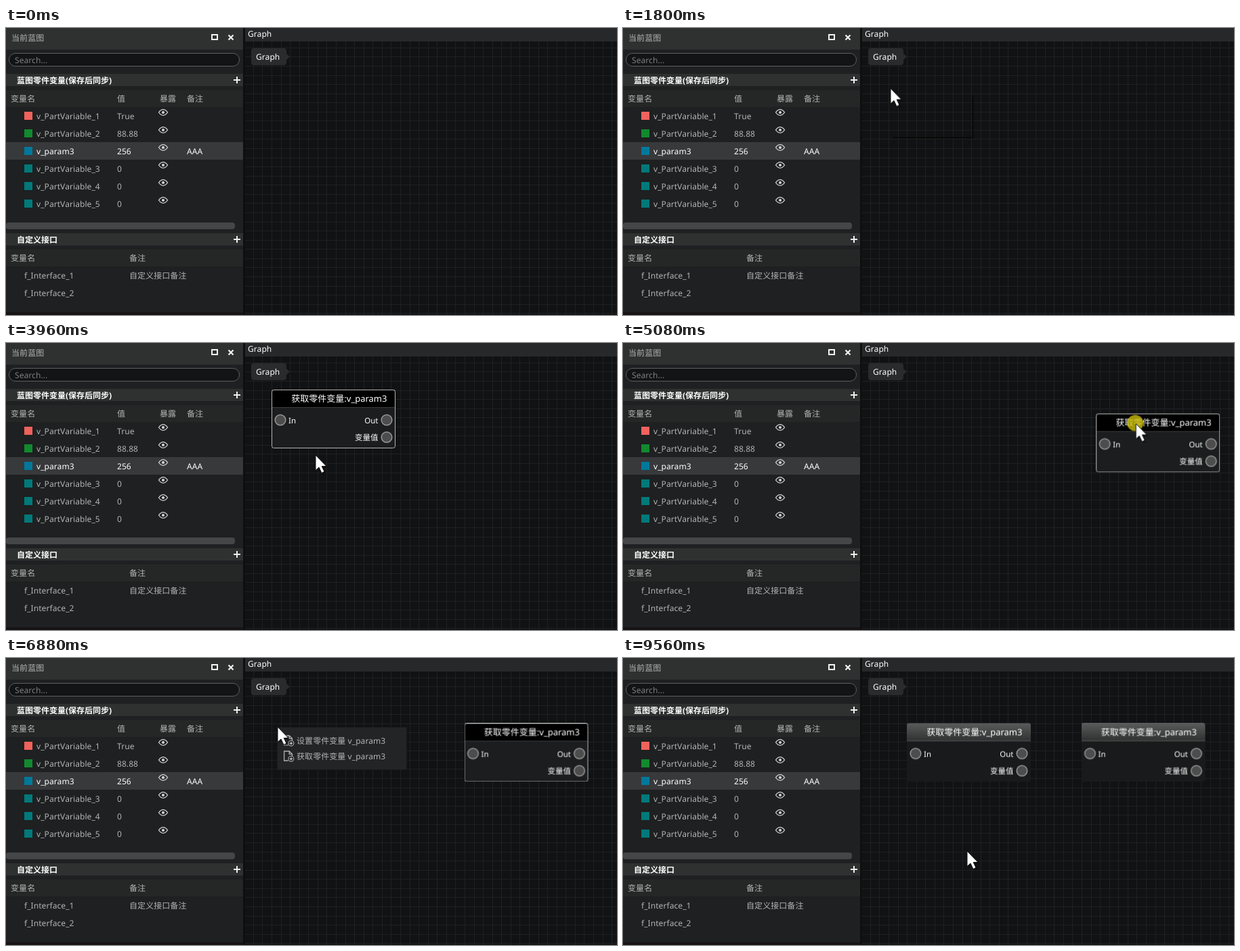
Animation, 902 px wide and 425 px high, one loop 10 s. Source, as an HTML page:

```html
<!DOCTYPE html>
<html lang="zh-CN">
<head>
<meta charset="utf-8">
<title>Graph</title>
<style>
html, body { margin: 0; width: 100%; height: 100%; overflow: hidden; background: #111213; }
svg { display: block; width: 902px; height: 425px; }
text {
  font: 12px 'Noto Sans', 'Noto Sans CJK SC', 'Noto Sans CJK', 'Noto Sans CJK JP', sans-serif;
  letter-spacing: .07px; white-space: pre; text-rendering: geometricPrecision;
}
.bold { font-weight: 700; letter-spacing: 0; }
.title { font-size: 13px; letter-spacing: 0; }
.port { font-size: 11.5px; letter-spacing: 0; }
</style>
</head>
<body>
<svg id="stage" viewBox="0 0 902 425"></svg>
<script>
const LOOP = 10000;
const GREY = '#b3b4b4', WHITE = '#fff';

// ---------- drawing helpers ----------
const text = (x, y, s, fill = GREY, attrs = '') =>
  `<text x="${x}" y="${y}" fill="${fill}" ${attrs}>${s}</text>`;
const rect = (x, y, w, h, fill, attrs = '') =>
  `<rect x="${x}" y="${y}" width="${w}" height="${h}" fill="${fill}" ${attrs}/>`;
const line = (d, stroke, width = 1, attrs = '') =>
  `<path d="${d}" fill="none" stroke="${stroke}" stroke-width="${width}" ${attrs}/>`;
const group = (id, body) => `<g id="${id}">${body}</g>`;

const plus = y => line(`M336 ${y}h10m-5-5v10`, '#eee', 2);
const eye = y => `<g transform="translate(232 ${y})">` +
  line('M-6.5 0Q-3.5-4.3 0-4.3T6.5 0Q3.5 4.3 0 4.3T-6.5 0Z', '#d4d4d4', 1.3) +
  `<circle r="2.1" fill="#d4d4d4"/></g>`;

const variables = [
  ['#f0625c', 'v_PartVariable_1', 'True'],
  ['#128a2e', 'v_PartVariable_2', '88.88'],
  ['#00789c', 'v_param3', '256', 'AAA'],
  ['#00797a', 'v_PartVariable_3', '0'],
  ['#00797a', 'v_PartVariable_4', '0'],
  ['#00797a', 'v_PartVariable_5', '0']
];

function variableCells([color, name, value, note = ''], y, fill) {
  return rect(27, y - 6, 12, 12, color) + text(45, y + 5, name, fill) +
    text(164, y + 5, value, fill) + text(267, y + 5, note, fill);
}

function panel() {
  const rows = variables.map((v, i) => {
    const y = 130 + 26 * i, chosen = i === 2;
    return (chosen ? rect(0, 169, 350, 26, '#38393b') : '') +
      variableCells(v, y, chosen ? WHITE : GREY) + eye(y - 5);
  }).join('');
  return rect(0, 0, 350, 425, '#1e2021') + rect(0, 0, 350, 32, '#2f3131') +
    text(8, 18.5, '当前蓝图') +
    rect(304, 10, 8, 7, 'none', 'stroke="#f2f2f2" stroke-width="2"') +
    line('M328.5 10.5l7 7m0-7l-7 7', '#f2f2f2', 2.2) +
    rect(4.5, 37.5, 340, 19, '#131416', 'rx="9.5" stroke="#5c5e5f"') +
    text(13, 52, 'Search...', '#7c7e7f') +
    rect(0, 68, 350, 18, '#2f3131') + text(16, 81.5, '蓝图零件变量(保存后同步)', WHITE, 'class="bold"') + plus(77) +
    rect(0, 92, 350, 25, '#252727') +
    text(7, 109, '变量名') + text(164, 109, '值') + text(227, 109, '暴露') + text(267, 109, '备注') +
    rows + rect(0, 288, 338, 10, '#454647', 'rx="4"') +
    rect(0, 304, 350, 18, '#2f3131') + text(16, 318, '自定义接口', WHITE, 'class="bold"') + plus(313) +
    rect(0, 328, 350, 25, '#252727') + text(7, 345, '变量名') + text(182, 345, '备注') +
    text(27, 371, 'f_Interface_1') + text(182, 371, '自定义接口备注') + text(27, 397, 'f_Interface_2') +
    rect(0, 421, 350, 4, '#171416');
}

function graph() {
  const pitch = 13.57;
  let grid = '';
  for (let x = 364.9; x < 902; x += pitch) grid += `M${Math.round(x) + .5} 20V425`;
  for (let y = 28.8; y < 425; y += pitch) grid += `M353 ${Math.round(y) + .5}H902`;
  return rect(350, 0, 552, 425, '#111213') + line(grid, '#1f2021') +
    rect(350, 0, 3, 425, '#0e0f10') + rect(353, 0, 549, 20, '#27282a') + text(357, 13, 'Graph', WHITE) +
    rect(362, 30, 52, 25, '#2a2b2c', 'rx="4"') + `<path d="M414 38l5 4.5-5 4.5z" fill="#2a2b2c"/>` +
    text(369, 47, 'Graph', WHITE);
}

// Node drawn with its top left corner at 0,0
function node(id) {
  const port = (x, y) => `<circle cx="${x}" cy="${y}" r="7.8" fill="#4d4d4d" stroke="#989898" stroke-width="1.5"/>`;
  return group(id,
    rect(0, 0, 183, 87, '#191a1b', 'rx="3"') +
    `<path d="M0 27V3q0-3 3-3h177q3 0 3 3v24z" fill="url(#head)"/>` +
    group(id + 'Chosen',
      rect(.5, .5, 182, 86, '#1c1d1e', 'rx="3"') + rect(1, 1, 181, 26, '#000', 'rx="2"') +
      line('M1 26.5h181', '#3b3c3c') +
      rect(.5, .5, 182, 86, 'none', 'rx="3" stroke="#b4b4b4"')) +
    text(29.3, 18, '获取零件变量:v_param3', WHITE, 'class="title"') +
    port(13, 45) + port(170, 45) + port(170, 70.5) +
    text(25, 49.5, 'In', WHITE, 'class="port"') +
    text(157.5, 49.5, 'Out', WHITE, 'class="port" text-anchor="end"') +
    text(157.5, 75, '变量值', WHITE, 'class="port" text-anchor="end"'));
}

function icon(x, y, call) {
  const body = call
    ? `<path d="M.5-7h8l4 4v9.500h-12z" fill="#d3e6f3"/>` + line('M2.500-3h5m-5 3h7m-7 3h5', '#6fa9d0') +
      `<circle cx="10.500" cy="4.500" r="3.800" fill="#58a843"/>` + line('M8.500 4.500h4m-2-2v4', WHITE, 1.3)
    : line('M7 6.500H1.500v-13h7l4 4V0M8.500-6.500v4h4', '#b0b1b1', 1.2) +
      `<circle cx="11" cy="4" r="3.700" fill="#222425" stroke="#b0b1b1"/>` + line('M9 4h4m-2-2v4', '#c8c8c8', 1.2);
  return `<g transform="translate(${x} ${y}) scale(1.08)">${body}</g>`;
}
const item = (x, y, label, fill = GREY) =>
  icon(x, y, label.startsWith('调用')) + text(x + 20, y + 4.5, label, fill);
const hotItem = (id, x, y, w, label) =>
  group(id, rect(x - 8, y - 11, w, 23, '#37393b') + item(x, y, label, WHITE));
const board = (x, y, w, h) =>
  rect(x - 1, y - 1, w + 2, h + 2, '#17191a') + rect(x, y, w, h, '#222425');

function popup(id, w, h, query, rows = '') {
  return group(id, board(390, 95, w, h) +
    rect(396.5, 108.5, w - 13, 19, '#131416', 'rx="4" stroke="#2f7de0"') +
    text(405, 122.5, query || 'Search...', query ? '#c4c5c5' : '#6c6e6f') +
    rect(393, 137, 12, 12, '#111214', 'rx="2"') + line('M395.500 143l2.500 3 5-6', '#2f8dff', 2) +
    text(413, 147.5, '开启联想', WHITE) + rows);
}
const list = labels => labels.map((s, i) => item(399, 164 + 23 * i, s)).join('');

const GET = '获取零件变量 v_param3', SET = '设置零件变量 v_param3';
const calls = [
  '调用UI控件接口:AddTouchEventParams(开启按钮回调功能)',
  '调用模型组件客户端接口:RegisterAnim1DControlParam(注册1D动画线性混合参数)',
  '调用模型组件客户端接口:SetAnim1DControlParam(设置1D动画线性混合参数)',
  '调用虚拟世界组件客户端接口:ModelRegisterAnim1DControlParam(模型注册1D动画线性混合参数)',
  '调用虚拟世界组件客户端接口:ModelSetAnim1DControlParam(模型设置1D动画线性混合参数)'
];
const builders = ['构造方块基础信息字典', '构造列表', '构造物品信息字典', '构造字典', GET, SET];
const matches = list([...calls, ...builders]);
const broad = list([...calls, '调用粒子组件客户端接口:SetParticleParent(设置粒子父级)', ...builders]);
const categories = ['事件', '流程控制', '变量', '接口', '数学', '逻辑', '字符串', '列表', '字典', '组件', '其他']
  .map((s, i) => line(`M400 ${160 + 23 * i}l4 4-4 4`, GREY, 1.3) + text(413, 168.5 + 23 * i, s)).join('');

const arrow = 'M0 0V22.500L5 18 9 26.500 13 24.500 9.200 16.500H16Z';

// ---------- scene ----------
stage.innerHTML =
  `<defs><linearGradient id="head" x2="0" y2="1"><stop stop-color="#5a5b5b"/><stop offset=".9" stop-color="#333434"/>
   <stop offset="1" stop-color="#4a4b4b"/></linearGradient></defs>` +
  graph() + panel() + node('nodeA') + node('nodeB') +
  popup('open', 127, 328, '', categories) +
  popup('typeP', 127, 328, 'p', categories) +
  popup('typePa', 127, 328, 'pa', categories) +
  popup('typePar', 127, 68, 'par') +
  group('trace', line('M398 162.500H516.500V100', '#090a0a', 2)) +
  popup('widePar', 530, 330, 'par', broad) +
  popup('widePara', 530, 320, 'para', matches) +
  popup('wideParam', 530, 320, 'param', matches) +
  popup('narrow', 192, 114, 'param3', list([GET, SET]) + hotItem('hotGet', 399, 164, 190, GET)) +
  group('caretA', line('M443.500 110v17', '#ddd')) +
  group('caretB', line('M450.500 110v17', '#ddd')) +
  group('menu', board(401, 103, 190, 62) + item(409, 122, SET) + item(409, 145, GET) +
    hotItem('hotTop', 409, 122, 190, SET) + hotItem('hotBottom', 409, 145, 190, GET)) +
  group('insert', line('M19 142.500H350', '#eee')) +
  group('cursor',
    group('ghost', `<g transform="translate(-110 -183)">${rect(19, 169, 331, 26, '#38393b')}${variableCells(variables[2], 182, WHITE)}</g>`) +
    group('press', `<circle cx="-1" cy="-1" r="12" fill="#c9bd08" opacity=".8"/>`) +
    group('bigArrow', `<path d="${arrow}" transform="translate(2 2)" opacity=".35"/>
      <path d="${arrow}" fill="#fff" stroke="#111"/>`) +
    group('dragArrow', `<path d="${arrow}" transform="scale(.7)" fill="#fff" stroke="#111" stroke-width="1.300"/>` +
      rect(10.5, 19.5, 8, 8, WHITE, 'stroke="#111"') + line('M12 23.500h5m-2.500-2.500v5', '#111', 1.4)));

// ---------- motion ----------
const el = id => document.getElementById(id);

function run(id, frames) {
  if (frames[0].offset > 0) frames.unshift({ ...frames[0], offset: 0, easing: 'step-end' });
  frames.push({ ...frames[frames.length - 1], offset: 1 });
  el(id).animate(frames, { duration: LOOP, iterations: Infinity });
}

// Visible during each [on, off] span
function show(id, ...spans) {
  const frames = [{ offset: 0, opacity: 0, easing: 'step-end' }];
  for (const [on, off] of spans) {
    frames.push({ offset: on / LOOP, opacity: 1, easing: 'step-end' });
    if (off < LOOP) frames.push({ offset: off / LOOP, opacity: 0, easing: 'step-end' });
  }
  run(id, frames);
}

// Points of [time, x, y, easing towards the next point]
function move(id, points) {
  run(id, points.map(([t, x, y, easing = 'linear']) =>
    ({ offset: t / LOOP, transform: `translate(${x}px, ${y}px)`, easing })));
}

const SOFT = 'ease-in-out';
move('cursor', [
  [120, 462, 208, SOFT], [400, 391, 95], [960, 391, 95], [1120, 395, 89.5],
  [3200, 395, 89.5, SOFT], [3560, 457, 166],
  [4320, 457, 166, SOFT], [4560, 451, 84],
  [4680, 451, 84, SOFT], [5120, 762, 120, SOFT], [5320, 736, 112],
  [5560, 736, 112, SOFT], [5920, 110, 183],
  [6040, 110, 183], [6200, 272, 132], [6240, 272, 132, 'ease-out'], [6600, 406, 101], [6680, 406, 101], [6720, 401, 102],
  [6920, 401, 102, SOFT], [7520, 442, 150],
  [8280, 442, 150, SOFT], [8440, 482, 84],
  [8580, 482, 84], [8720, 496, 112],
  [9080, 496, 112, SOFT], [9400, 508, 286]
]);
move('nodeA', [[4680, 392, 69, SOFT], [5120, 703, 105, SOFT], [5320, 676.5, 96.5]]);
move('nodeB', [[8580, 405, 69], [8720, 419, 96.5]]);

show('bigArrow', [120, 6040], [6880, LOOP]);
show('dragArrow', [6040, 6880]);
show('ghost', [6080, 6880]);
show('press', [600, 760], [3760, 3920], [4640, 5360], [5960, 6040], [7920, 8040], [8580, 8920], [9440, 9540]);
show('insert', [6120, 6360]);

show('nodeA', [3840, LOOP]);
show('nodeAChosen', [3840, 8000]);
show('nodeB', [8020, LOOP]);
show('nodeBChosen', [8020, 9480]);

show('open', [720, 1440]);
show('typeP', [1440, 1560]);
show('typePa', [1560, 1680]);
show('typePar', [1680, 1800]);
show('trace', [1800, 1840]);
show('widePar', [1840, 2000]);
show('widePara', [2000, 2040]);
show('wideParam', [2040, 2520]);
show('narrow', [2520, 3840]);
show('hotGet', [3480, 3840]);
show('caretA', [2040, 2360]);
show('caretB', [2520, 2920], [3440, 3840]);
show('menu', [6880, 8000]);
show('hotTop', [7080, 7280]);
show('hotBottom', [7280, 8000]);
</script>
</body>
</html>
```
